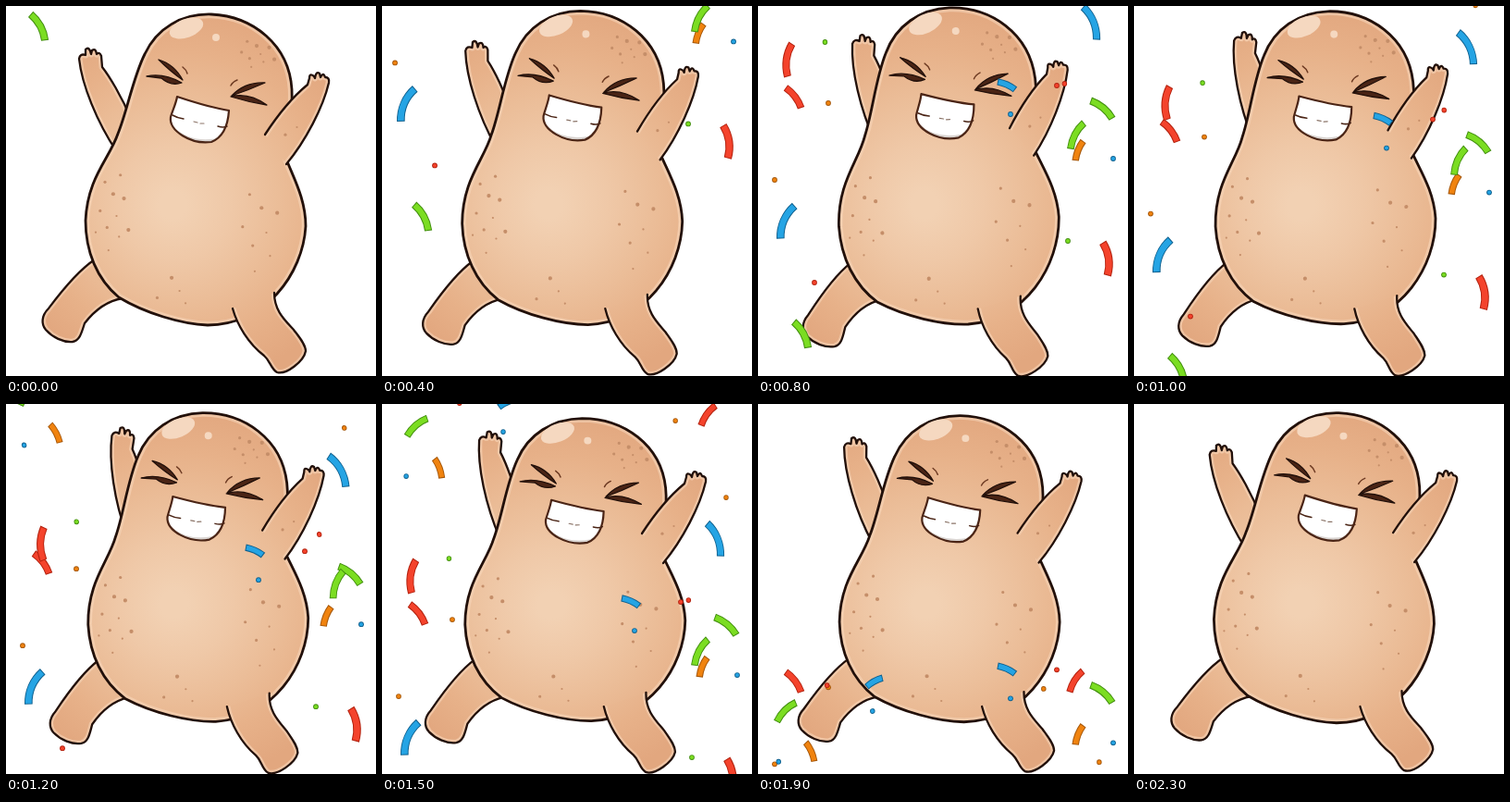
An HTML page with a canvas that plays this animation: 400 px wide and 400 px high, repeating every 2.4 s.

```html
<!DOCTYPE html>
<html lang="en">
<head>
<meta charset="utf-8">
<title>Happy potato</title>
<style>
html, body { margin: 0; width: 100%; height: 100%; overflow: hidden; background: #fff; }
canvas { display: block; width: 400px; height: 400px; }
</style>
</head>
<body>
<canvas id="stage" width="400" height="400"></canvas>
<script>
const ctx = document.getElementById('stage').getContext('2d');
const LOOP = 2400, STEP = 100;
const INK = '#22100a', BROWN = '#4a2415', SPOT = '#c58e69';
const COLORS = {
  green: ['#7bdd22', '#438f10'], blue: ['#25a4e4', '#10608e'],
  red: ['#f4432c', '#b3220f'], orange: ['#f0830f', '#a5570a']
};

// Each part swings from rest to "up", then "down", then back: [x, y, turn, stretch].
const PARTS = {
  body: { pivot: [194, 216], up: [0, -1.5, -.071, .02], down: [3, 2.2, -.043, -.026] },
  armR: { pivot: [300, 150], up: [-7, -9, -.105, 0], down: [1, 1, 0, 0] },
  legL: { pivot: [75, 310], up: [7, 5, -.07, 0], down: [6, 3, -.043, 0] },
  legR: { pivot: [268, 322], up: [-7, 2, .07, 0], down: [-5, 1, .04, 0] }
};

// Strips have an angle and a length, dots only a place.
const CONFETTI = [
  ['green', 49, 354, -.5, 31], ['blue', 28, 232, 3.55, 38], ['red', 379, 273, -.14, 35],
  ['green', 373, 110, -.88, 29], ['orange', 346, 156, 3.52, 21], ['red', 40, 98, -.65, 26],
  ['blue', 269, 85, -1.15, 19],
  ['red', 61, 299], ['orange', 18, 188], ['orange', 76, 105], ['blue', 384, 165],
  ['green', 335, 254], ['red', 323, 86], ['blue', 273, 117]
];

const path = d => new Path2D(d);
const BODY = path('M222 9C267 11 306 42 309 90C311 122 300 150 304 168C312 188 324 210 324 238' +
  'C321 290 280 345 218 345C190 344 150 332 122 315C98 295 86 265 86 232' +
  'C88 185 112 165 121 138C131 114 137 78 150 52C163 24 190 8 222 9Z');
const ARM_L = path('M136 124C125 97 111 75 104 66L103 54Q101 49 98 52Q97 45 93 48L92 52' +
  'Q90 43 86 47L86 53Q80 51 79 57C82 85 98 125 120 158');
const ARM_R = path('M280 139C293 119 309 99 326 85L328 78Q328 72 333 76L334 78Q335 70 339 73' +
  'L340 77Q343 71 345 77Q350 77 349 83C343 109 324 146 303 171');
const LEG_L = path('M96 274C75 288 55 315 46 327C38 335 38 344 43 350C50 358 62 364 72 363' +
  'C80 362 82 352 85 343C95 330 108 319 126 316');
const LEG_R = path('M245 327C250 345 262 365 279 378C286 384 286 392 293 396' +
  'C303 399 322 384 324 373C324 366 317 358 311 350C302 340 290 330 290 310');
const MOUTH = path('M185 98C203 104 222 110 241 113C240 128 235 142 222 147' +
  'C200 150 176 135 178 120C180 113 184 105 185 98Z');
const EYES = path('M165 58Q182 63 191 80Q178 71 165 58ZM152 76Q170 72 190 83Q178 87 168 78Z' +
  'M280 83Q258 82 244 97Q262 91 280 83ZM243 98Q262 93 282 107Q262 104 243 98Z');

const glow = ctx.createRadialGradient(180, 215, 15, 190, 205, 205);
['#f2d1b3', '#efc8a7', '#ebbd98', '#e7b189', '#e2a77f']
  .forEach((color, i) => glow.addColorStop(i / 4, color));

// Rises from 0 to 1 and falls back in straight lines.
const hat = (t, from, peak, to) =>
  Math.max(0, Math.min((t - from) / (peak - from), (to - t) / (to - peak)));

function placed(x, y, turn, stretch, [px, py], draw) {
  ctx.save();
  ctx.translate(px + x, py + y);
  ctx.rotate(turn);
  ctx.scale(1, 1 + stretch);
  ctx.translate(-px, -py);
  draw();
  ctx.restore();
}

function moved(name, t, draw) {
  const { pivot, up, down } = PARTS[name];
  const u = hat(t, 0, 800, 1500), d = hat(t, 800, 1500, LOOP);
  placed(...up.map((v, i) => v * u + down[i] * d), pivot, draw);
}

function fill(shape, color) {
  ctx.fillStyle = color;
  ctx.fill(shape);
}

function line(shape, color, width) {
  ctx.strokeStyle = color;
  ctx.lineWidth = width;
  ctx.stroke(typeof shape === 'string' ? path(shape) : shape);
}

function oval(x, y, rx, ry, turn, color) {
  ctx.fillStyle = color;
  ctx.beginPath();
  ctx.ellipse(x, y, rx, ry, turn, 0, 2 * Math.PI);
  ctx.fill();
}

function skin(shape, width) {
  fill(shape, glow);
  ctx.save();
  ctx.clip(shape);
  line(shape, 'rgba(248,215,187,.6)', width * 3);
  ctx.restore();
  line(shape, INK, width);
}

// Freckles spread in a sunflower spiral over an oval.
function freckles(x, y, rx, ry, count) {
  for (let i = 0; i < count; i++) {
    const r = Math.sqrt((i + .5) / count), size = 1.1 + i % 3 * .5;
    oval(x + rx * r * Math.cos(2.4 * i), y + ry * r * Math.sin(2.4 * i), size, size, 0, SPOT);
  }
}

function drawFace() {
  fill(MOUTH, '#fff');
  ctx.save();
  ctx.clip(MOUTH);
  line('M180 133Q198 150 226 146Q235 141 239 130', '#d9d4d1', 5);
  ctx.restore();
  line(MOUTH, BROWN, 2.2);
  line('M180 118Q185 121 192 122M229 130Q235 132 239 130', BROWN, 1.5);
  line('M203 125L207 126M210 127L214 127', '#8b7468', 1.2);
  fill(EYES, BROWN);
  line(EYES, INK, 1.3);
  line('M191 66Q195 69 196 73M243 86Q245 82 250 80', '#6d3a22', 1.5);
}

function drawBody() {
  skin(BODY, 2.8);
  oval(195, 24, 19, 10, -.35, '#f5d8c0');
  oval(227, 34, 4, 4, 0, '#f5d8c0');
  freckles(270, 52, 22, 17, 9);
  freckles(115, 227, 21, 50, 11);
  freckles(275, 245, 26, 48, 8);
  freckles(177, 308, 30, 18, 4);
  drawFace();
}

function drawPiece([color, x, y, angle, length]) {
  const [main, edge] = COLORS[color];
  if (!length) {
    oval(x, y, 2.9, 2.9, 0, edge);
    oval(x, y, 2, 2, 0, main);
    return;
  }
  const radius = 45, half = length / radius / 2, width = 4 + length * .07;
  const band = (grow, tint) => {
    ctx.beginPath();
    ctx.arc(-radius, 0, radius, -half - grow / radius, half + grow / radius);
    ctx.strokeStyle = tint;
    ctx.lineWidth = width + 2 * grow;
    ctx.stroke();
  };
  ctx.save();
  ctx.lineCap = 'butt';
  ctx.translate(x, y);
  ctx.rotate(angle);
  band(1, edge);
  band(0, main);
  ctx.restore();
}

// Two sheets share one fall; the second is a mirrored, rocking copy higher up.
function drawConfetti(t) {
  const early = Math.max(0, 1 - t / 800);
  const fall = .183 * (t - 800) - 186 * early ** 1.8;
  const rush = from => 224 * (Math.max(0, t - from) / 400) ** 2;
  const sheet = () => CONFETTI.forEach(drawPiece);

  placed(-12 * early ** 1.6, fall + rush(1900), 0, 0, [0, 0], sheet);
  const rock = -.12 * hat(t, 800, 1200, 1500) - .065 * hat(t, 1500, 1900, 2300);
  placed(0, fall - 215 + rush(1500), rock, 0, [200, 230], () => {
    ctx.transform(-.945, 0, 0, 1, 389, 0);
    sheet();
  });
}

function draw(t) {
  ctx.fillStyle = '#fff';
  ctx.fillRect(0, 0, 400, 400);
  placed(0, 0, .236 * hat(t, 0, 1200, LOOP), 0, [193, 195], () => skin(ARM_L, 2.3));
  moved('legL', t, () => skin(LEG_L, 2.3));
  moved('body', t, drawBody);
  moved('legR', t, () => skin(LEG_R, 2.3));
  moved('armR', t, () => {
    skin(ARM_R, 2.3);
    freckles(309, 131, 11, 14, 2);
  });
  drawConfetti(t);
}

ctx.lineCap = ctx.lineJoin = 'round';
const start = performance.now();
function tick() {
  const t = (performance.now() - start) % LOOP;
  draw(Math.floor(t / STEP) * STEP);
  requestAnimationFrame(tick);
}
tick();
</script>
</body>
</html>
```
